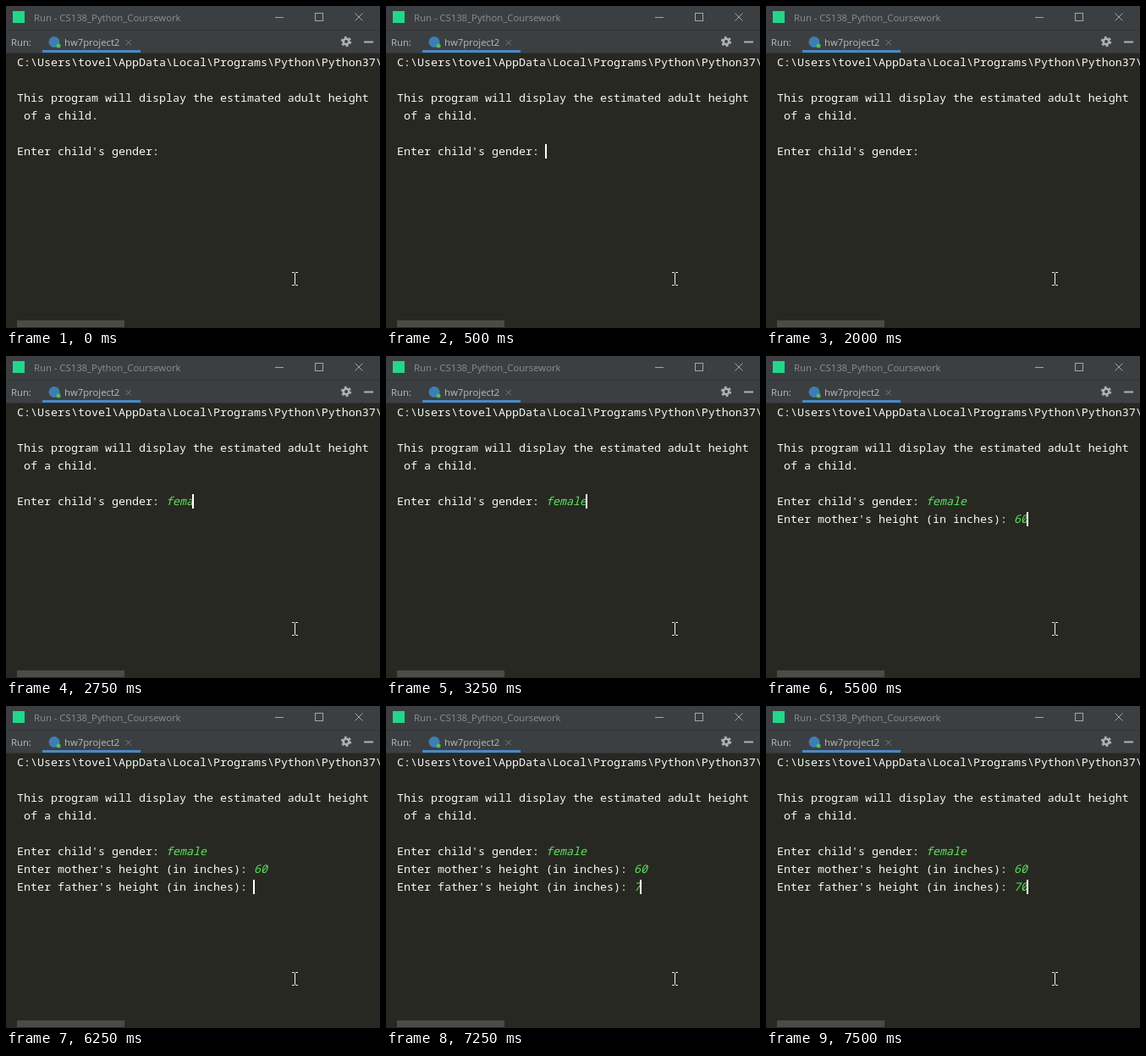
Animation, 442 px wide and 380 px high, one loop 8000 ms. Source, as an HTML page:

```html
<!DOCTYPE html>
<html lang="en">
<head>
<meta charset="utf-8">
<title>Console run</title>
<style>
  html, body { margin: 0; width: 100%; height: 100%; overflow: hidden; background: #272822; }
  svg { display: block; width: 442px; height: 380px; }
  text { white-space: pre; }
  .ui { font: 11.3px "Open Sans", "Noto Sans", sans-serif; }
  .mono { font: 13.333px "Noto Sans Mono", "DejaVu Sans Mono", monospace; fill: #f8f8f4; }
  .input { fill: #5be25b; font-style: italic; }
  .line { fill: none; stroke-width: 1; }
</style>
</head>
<body>
<svg viewBox="0 0 442 380" xmlns="http://www.w3.org/2000/svg">
  <rect width="442" height="380" fill="#272822"/>
  <rect width="442" height="56" fill="#3c3f41"/>
  <path class="line" d="M0 28.5H442M0 55.5H442" stroke="#323537"/>

  <!-- title bar -->
  <rect x="8" y="6" width="14" height="14" fill="#21d789"/>
  <text class="ui" x="33" y="18" fill="#8c8e8f">Run - CS138_Python_Coursework</text>
  <g class="line" stroke="#a4a6a7">
    <path d="M318 13.5H328M412.5 8.5l9 9m0-9l-9 9"/>
    <rect x="365.5" y="8.5" width="9" height="9"/>
  </g>

  <!-- tool window tab -->
  <text class="ui" x="6" y="47" fill="#bbbbbb">Run:</text>
  <circle cx="57" cy="42.5" r="6.5" fill="#3d7fb5"/>
  <circle cx="62" cy="47" r="2.5" fill="#4fc24f"/>
  <text class="ui" x="69" y="47" fill="#bbbbbb">hw7project2</text>
  <path class="line" d="M141.5 40l6.5 6.5m0-6.5l-6.5 6.5" stroke="#777a7c"/>
  <rect x="43" y="52" width="116" height="3" fill="#4a88c7"/>
  <g fill="none" stroke="#afb1b3">
    <circle cx="402" cy="42" r="3.3" stroke-width="2.6"/>
    <circle cx="402" cy="42" r="5.2" stroke-width="2" stroke-dasharray="2.72 2.72"/>
    <path d="M423 42.5H434" stroke-width="2"/>
  </g>

  <g id="console"></g>
  <rect id="caret" width="2" height="17" fill="#ffffff"/>

  <rect x="13" y="371" width="127" height="8" fill="#4b4c48"/>
  <path class="line" d="M338 314.5h2.5l1 1 1-1H345M338 329.5h2.5l1-1 1 1H345M341.5 315.5v13" stroke="#f4f4f4"/>
</svg>
<script>
  const LOOP = 8000, LEFT = 13, CHAR = 8, ROW = 21;
  const svgNS = "http://www.w3.org/2000/svg";
  const consoleGroup = document.getElementById("console");
  const caret = document.getElementById("caret");

  const intro = [
    [0, "C:\\Users\\tovel\\AppData\\Local\\Programs\\Python\\Python37\\"],
    [2, "This program will display the estimated adult height"],
    [3, " of a child."]
  ];

  // keys: [time, text typed so far]
  const prompts = [
    { row: 5, start: 0, label: "Enter child's gender: ",
      keys: [[2250, "f"], [2500, "fe"], [2750, "fema"], [3000, "femal"], [3250, "female"]] },
    { row: 6, start: 3750, label: "Enter mother's height (in inches): ", keys: [[5500, "60"]] },
    { row: 7, start: 6000, label: "Enter father's height (in inches): ",
      keys: [[7000, "7"], [7500, "70"]] }
  ];
  const caretOff = [[0, 500], [1000, 1500], [2000, 2250], [4500, 5000]];

  function addText(row, column, content, kind = "") {
    const node = document.createElementNS(svgNS, "text");
    node.setAttribute("class", "mono " + kind);
    node.setAttribute("x", LEFT + column * CHAR);
    node.setAttribute("y", 71 + row * ROW);
    node.textContent = content;
    consoleGroup.appendChild(node);
    return node;
  }

  intro.forEach(([row, content]) => addText(row, 0, content));
  for (const p of prompts) {
    p.labelNode = addText(p.row, 0, p.label);
    p.inputNode = addText(p.row, p.label.length, "", "input");
  }

  function typedAt(keys, t) {
    return keys.reduce((typed, [time, value]) => t >= time ? value : typed, "");
  }

  function render(t) {
    for (const p of prompts) {
      const shown = t >= p.start;
      const typed = typedAt(p.keys, t);
      p.labelNode.style.display = shown ? "" : "none";
      p.inputNode.textContent = typed;
      if (shown) {
        caret.setAttribute("x", LEFT - 1 + (p.label.length + typed.length) * CHAR);
        caret.setAttribute("y", 58 + p.row * ROW);
      }
    }
    const hidden = caretOff.some(([from, to]) => t >= from && t < to);
    caret.style.display = hidden ? "none" : "";
  }

  const begin = performance.now();
  function tick() {
    render((performance.now() - begin) % LOOP);
    requestAnimationFrame(tick);
  }
  render(0);
  requestAnimationFrame(tick);
</script>
</body>
</html>
```
